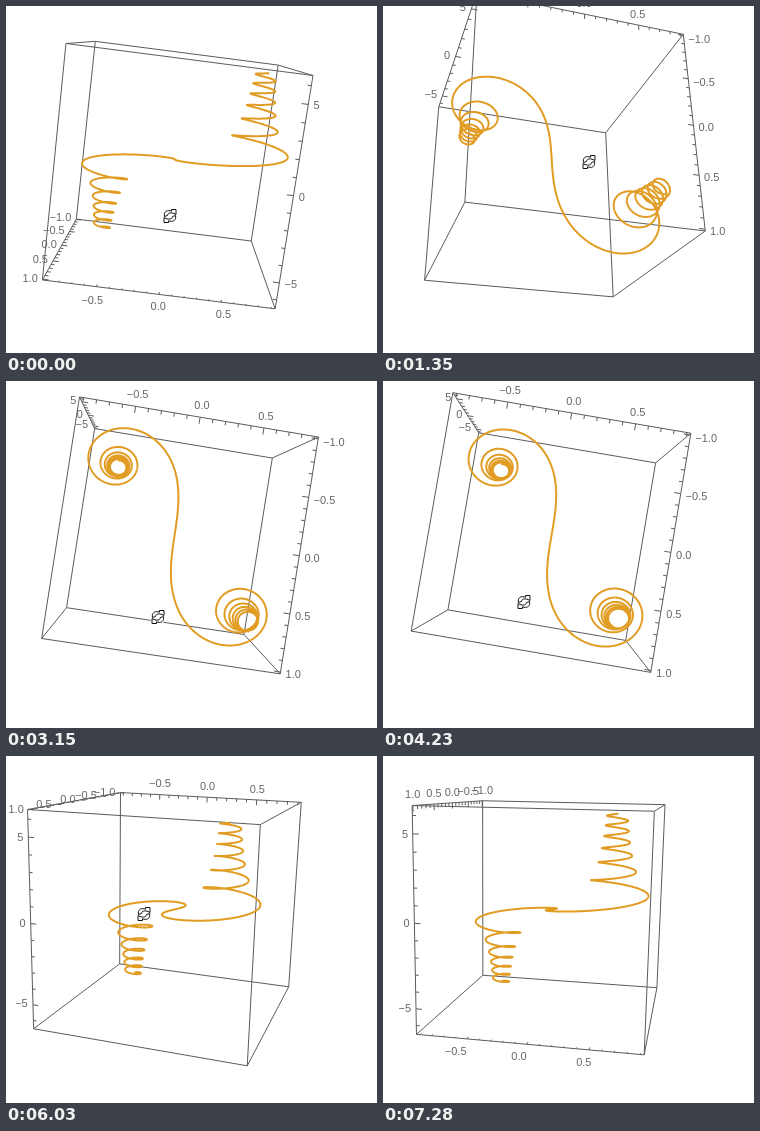
These frames come from a looping animation (371x347 px, 7.99 s). An HTML page:

```html
<!DOCTYPE html>
<html lang="en">
<head>
<meta charset="utf-8">
<title>Rotating Fresnel curve</title>
<style>
  html, body { margin: 0; width: 100%; height: 100%; overflow: hidden; background: #fff; }
  svg { display: block; width: 371px; height: 347px; }
  .box { stroke: #5c5c5c; stroke-width: 1; fill: none; }
  .curve { stroke: #e19c24; stroke-width: 2; fill: none; stroke-linejoin: round; }
  text { font: 11px "Liberation Sans", Arial, sans-serif; fill: #666; text-anchor: middle; }
  .halo { stroke: #fff; stroke-width: 3; fill: #fff; }
  .ink { stroke: #111; stroke-width: 1; fill: #fff; }
</style>
</head>
<body>
<svg id="stage" viewBox="0 0 371 347"></svg>
<script>
const LOOP = 7990;
const STEP = 90;
const CENTER = [168.7, 153.4];
const SCALE = 699;
const DIST = 6.77;
const T_MAX = 2 * Math.PI;
const HALF = [0.931, 1.016, 6.535]; // half ranges of x, y, z

// Orientation quaternion (w, x, y, z) and pointer position
const POSES = [
  { q: [0.7628, 0.639, 0.0469, 0.043], at: [164, 210] },
  { q: [0.9624, 0.2333, 0.1501, 0.0342], at: [206, 156] },
  { q: [0.991, 0.0985, 0.035, 0.0699], at: [155, 208] },
  { q: [0.9964, -0.0088, 0.027, 0.0785], at: [152, 236] },
  { q: [0.9961, 0.0101, -0.0023, 0.0847], at: [141, 221] },
  { q: [0.7784, 0.608, -0.0909, 0.1361], at: [138, 158] },
  { q: [0.7645, 0.6405, -0.0578, 0.0817], at: [150, 160] }
];

// Time in ms, position along the list of poses
const DRAG = [
  [0, 0], [1350, 1], [1440, 1], [2340, 2], [3150, 3], [3330, 3],
  [3960, 3.9], [4140, 3.9], [4230, 4], [4410, 3.4], [4770, 4.09], [4860, 4.09],
  [5220, 4.13], [5310, 4.13], [6030, 5], [6120, 5.06], [6210, 5.06],
  [6830, 5.9], [7010, 5.9], [7280, 6], [LOOP, 6]
];

// For x, y, z: corner the axis runs through (0 = along), and tick direction
const AXES = [
  { until: 540, x: [[0, 1, -1], [0, -1, 0]], y: [[-1, 0, -1], [1, 0, 0]], z: [[1, 1, 0], [-1, 0, 0]] },
  { until: 4950, x: [[0, -1, 1], [0, 1, 0]], y: [[1, 0, 1], [-1, 0, 0]], z: [[-1, -1, 0], [1, 0, 0]] },
  { until: 6570, x: [[0, -1, 1], [0, 0, -1]], y: [[-1, 0, 1], [1, 0, 0]], z: [[-1, 1, 0], [1, 0, 0]] },
  { until: LOOP, x: [[0, 1, -1], [0, -1, 0]], y: [[-1, 0, 1], [0, 0, -1]], z: [[-1, 1, 0], [1, 0, 0]] }
];

// Minor tick size, how many each side, decimals on the labels
const SCALES = [[0.1, 9, 1], [0.1, 10, 1], [1, 6, 0]];

// One of the two bent arrows of the rotate pointer
const ARROW = "M-5.5 .5C-6.5 -4 -3.5 -6 0 -5.2L1.5 -4.8V-6.5H6V-1.5L4 -2.5C1 -3.5 -2 -3.5 -2.5 -.5Z";

const stage = document.getElementById("stage");
const mix = (a, b, k) => a + (b - a) * k;
const fix = n => n.toFixed(2);

// x = integral of sin t², y = integral of cos t², z = t
function fresnel() {
  const n = 900, h = T_MAX / n, half = [];
  let x = 0, y = 0;
  for (let i = 0; i < n; i++) {
    const m = ((i + 0.5) * h) ** 2;
    x += Math.sin(m) * h;
    y += Math.cos(m) * h;
    half.push([x / HALF[0], y / HALF[1], (i + 1) * h / HALF[2]]);
  }
  const mirrored = half.map(p => p.map(v => -v)).reverse();
  return [...mirrored, [0, 0, 0], ...half];
}

function boxEdges() {
  const edges = [];
  for (let axis = 0; axis < 3; axis++)
    for (const u of [-1, 1])
      for (const v of [-1, 1]) {
        const from = [0, 0, 0];
        from[(axis + 1) % 3] = u;
        from[(axis + 2) % 3] = v;
        const to = from.slice();
        from[axis] = -1;
        to[axis] = 1;
        edges.push([from, to]);
      }
  return edges;
}

const CURVE = fresnel();
const EDGES = boxEdges();

function slerp(a, b, k) {
  const angle = Math.acos(Math.min(1, a.reduce((s, v, i) => s + v * b[i], 0)));
  if (angle < 1e-3) return a.map((v, i) => mix(v, b[i], k));
  return a.map((v, i) => Math.sin((1 - k) * angle) * v + Math.sin(k * angle) * b[i]);
}

function projector(quat) {
  const len = Math.hypot(...quat);
  const [w, x, y, z] = quat.map(v => v / len);
  const m = [
    [1 - 2 * (y * y + z * z), 2 * (x * y - w * z), 2 * (x * z + w * y)],
    [2 * (x * y + w * z), 1 - 2 * (x * x + z * z), 2 * (y * z - w * x)],
    [2 * (x * z - w * y), 2 * (y * z + w * x), 1 - 2 * (x * x + y * y)]
  ];
  return p => {
    const [px, py, pz] = m.map(r => r[0] * p[0] + r[1] * p[1] + r[2] * p[2]);
    const f = SCALE / (DIST - pz);
    return [CENTER[0] + px * f, CENTER[1] + py * f];
  };
}

const polyline = pts => "M" + pts.map(p => fix(p[0]) + " " + fix(p[1])).join("L");

function drawAxis(axis, [corner, dir], project) {
  const [unit, count, digits] = SCALES[axis];
  let ticks = "", labels = "";
  for (let i = -count; i <= count; i++) {
    const major = i % 5 === 0;
    const base = corner.slice();
    base[axis] = i * unit / HALF[axis];
    const size = major ? 0.055 : 0.032;
    const p = project(base);
    ticks += polyline([p, project(base.map((v, k) => v + dir[k] * size))]);
    if (!major) continue;

    const far = project(base.map((v, k) => v + dir[k] * 0.3));
    const len = Math.hypot(p[0] - far[0], p[1] - far[1]) || 1;
    const ux = (p[0] - far[0]) / len, uy = (p[1] - far[1]) / len;
    const label = (i * unit).toFixed(digits).replace("-", "\u2212");
    const width = digits ? (i < 0 ? 21 : 15) : (i < 0 ? 12.5 : 6);
    const gap = 4.5 + Math.abs(ux) * width / 2 + Math.abs(uy) * 6.5;
    labels += `<text x="${fix(p[0] + ux * gap)}" y="${fix(p[1] + uy * gap + 4)}">${label}</text>`;
  }
  return `<path class="box" d="${ticks}"/>${labels}`;
}

function poseAt(t) {
  let i = 0;
  while (i < DRAG.length - 2 && t >= DRAG[i + 1][0]) i++;
  const [t0, v0] = DRAG[i], [t1, v1] = DRAG[i + 1];
  const v = mix(v0, v1, (t - t0) / (t1 - t0));
  const n = Math.min(Math.floor(v), POSES.length - 2);
  const a = POSES[n], b = POSES[n + 1], k = v - n;
  return { q: slerp(a.q, b.q, k), at: a.at.map((c, j) => mix(c, b.at[j], k)) };
}

function drawPointer(t, at) {
  if (t >= 7280) return "";
  const [x, y] = t >= 7190 ? [349, 299] : at;
  const pair = name => `<path class="${name}" d="${ARROW}"/>` +
    `<path class="${name}" d="${ARROW}" transform="rotate(180)"/>`;
  return `<g transform="translate(${fix(x)} ${fix(y)})">${pair("halo")}${pair("ink")}</g>`;
}

function draw(t) {
  const pose = poseAt(t);
  const project = projector(pose.q);
  const axes = AXES.find(a => t < a.until);
  stage.innerHTML =
    `<path class="box" d="${EDGES.map(e => polyline(e.map(project))).join("")}"/>` +
    ["x", "y", "z"].map((name, i) => drawAxis(i, axes[name], project)).join("") +
    `<path class="curve" d="${polyline(CURVE.map(project))}"/>` +
    drawPointer(t, pose.at);
}

// The picture advances in even steps; the last stretch runs 10 ms early
function stepTime(t) {
  const shift = t >= 6830 ? 10 : 0;
  return Math.floor((t + shift) / STEP) * STEP - shift;
}

const start = performance.now();
let shown = -1;
function tick() {
  const t = stepTime((performance.now() - start) % LOOP);
  if (t !== shown) draw(shown = t);
  requestAnimationFrame(tick);
}
tick();
</script>
</body>
</html>
```
